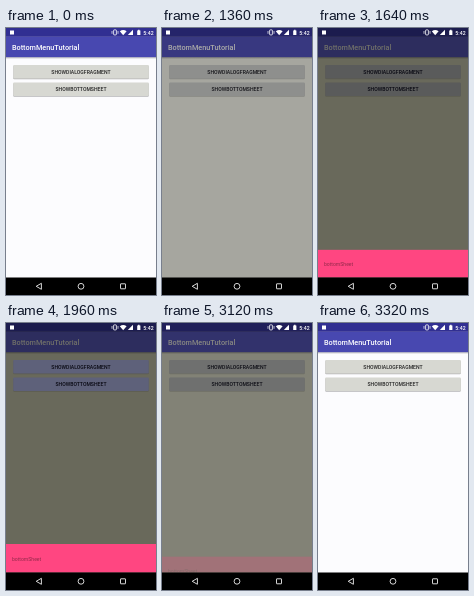
Animation, 150 px wide and 267 px high, one loop 3.36 s. Source, as an HTML page:

```html
<!DOCTYPE html>
<html lang="en">
<head>
<meta charset="utf-8">
<title>Bottom sheet demo</title>
<style>
  html, body { margin: 0; width: 100%; height: 100%; overflow: hidden; background: #000; }
  svg { display: block; width: 100%; height: 100%; }
  text { font-family: Roboto, sans-serif; }
  .label { font-size: 5.1px; font-weight: 500; text-anchor: middle; }
</style>
</head>
<body>
<svg viewBox="0 0 150 267">
  <defs>
    <linearGradient id="fade" x2="0" y2="1">
      <stop offset="0" stop-color="#000" stop-opacity=".25"/>
      <stop offset="1" stop-color="#000" stop-opacity="0"/>
    </linearGradient>
    <clipPath id="screen"><rect width="150" height="249.5"/></clipPath>
  </defs>

  <rect id="page" width="150" height="250"/>
  <rect id="bar" y="8.7" width="150" height="20.5"/>
  <rect y="29.2" width="150" height="2" fill="url(#fade)"/>
  <rect id="status" width="150" height="8.8"/>
  <text id="title" x="5.9" y="21.6" font-size="7.3" font-weight="500">BottomMenuTutorial</text>

  <g id="shadows" fill="#000">
    <rect x="7.2" y="37.7" width="135.6" height="13.6" rx="1"/>
    <rect x="7.2" y="55.2" width="135.6" height="13.6" rx="1"/>
  </g>
  <g id="buttons">
    <rect x="7.2" y="37.1" width="135.6" height="13.3" rx=".8"/>
    <rect x="7.2" y="54.6" width="135.6" height="13.3" rx=".8"/>
  </g>
  <g id="labels">
    <text class="label" x="75" y="45.7">SHOWDIALOGFRAGMENT</text>
    <text class="label" x="75" y="63.2">SHOWBOTTOMSHEET</text>
  </g>

  <g clip-path="url(#screen)">
    <g id="sheet">
      <rect width="150" height="30" fill="#ff4681"/>
      <text x="5.9" y="16.5" font-size="5.1" fill="#000" fill-opacity=".42">bottomSheet</text>
    </g>
  </g>

  <g fill="#fff">
    <rect x="4" y="2.5" width="4" height="4"/>
    <rect x="107.6" y="1.9" width="2.8" height="5" rx=".5" fill="none" stroke="#fff" stroke-width=".8"/>
    <path d="M106 3v2.8M112 3v2.8" stroke="#fff" stroke-width=".7"/>
    <path d="M113.8 3.2Q117.2 .8 120.6 3.2L117.2 7.3Z"/>
    <path d="M127 1.8V7H121.8Z"/>
    <path d="M131.2 2.4h.9v-.7h1.4v.7h.9v4.7h-3.2z"/>
    <text x="147.6" y="6.8" font-size="5.2" font-weight="500" text-anchor="end">5:42</text>
  </g>

  <rect y="249.5" width="150" height="17.5" fill="#000"/>
  <g fill="none" stroke="#eee" stroke-width=".9" stroke-linejoin="round">
    <path d="M35.4 255.3v6L30.2 258.3Z"/>
    <circle cx="75" cy="258.3" r="2.9"/>
    <rect x="114.5" y="255.8" width="5" height="5" rx=".3"/>
  </g>
</svg>
<script>
  const LOOP = 3360, STEP = 40;
  const REST = 221, HIDDEN = 249.5;
  const $ = id => document.getElementById(id);

  // Light and dimmed colour of each part
  const TONES = {
    page: [[252, 252, 254], [105, 105, 91]],
    bar: [[72, 72, 176], [45, 45, 94]],
    status: [[49, 47, 146], [28, 28, 78]],
    title: [[255, 255, 255], [112, 112, 105]],
    buttons: [[215, 216, 210], [90, 91, 91]],
    labels: [[38, 38, 38], [8, 8, 18]]
  };
  const TINTED = [94, 97, 122];

  const ramp = (t, a, b) => Math.min(1, Math.max(0, (t - a) / (b - a)));
  const mix = (a, b, p) => a + (b - a) * p;
  const blend = (a, b, p) => a.map((v, i) => mix(v, b[i], p));

  function draw(t) {
    const dim = ramp(t, 1220, 1460) - ramp(t, 3080, 3320);
    const tint = t < 3040 ? ramp(t, 1680, 1960) : 0;
    for (const id in TONES) {
      const [light, base] = TONES[id];
      const dark = id === "buttons" ? blend(base, TINTED, tint) : base;
      $(id).setAttribute("fill", `rgb(${blend(light, dark, dim).map(Math.round)})`);
    }
    $("shadows").setAttribute("opacity", mix(.28, .12, dim));

    const rise = 1 - (1 - ramp(t, 1446, 1680)) ** 2;
    const drop = ramp(t, 3040, 3160) ** 2;
    const y = mix(HIDDEN, REST, rise) + (HIDDEN - REST) * drop;
    $("sheet").setAttribute("transform", `translate(0 ${y})`);
    $("sheet").setAttribute("opacity", 1 - ramp(t, 3000, 3160));
  }

  const start = performance.now();
  function tick() {
    const t = (performance.now() - start) % LOOP;
    draw(Math.floor(t / STEP) * STEP);
    requestAnimationFrame(tick);
  }
  tick();
</script>
</body>
</html>
```
